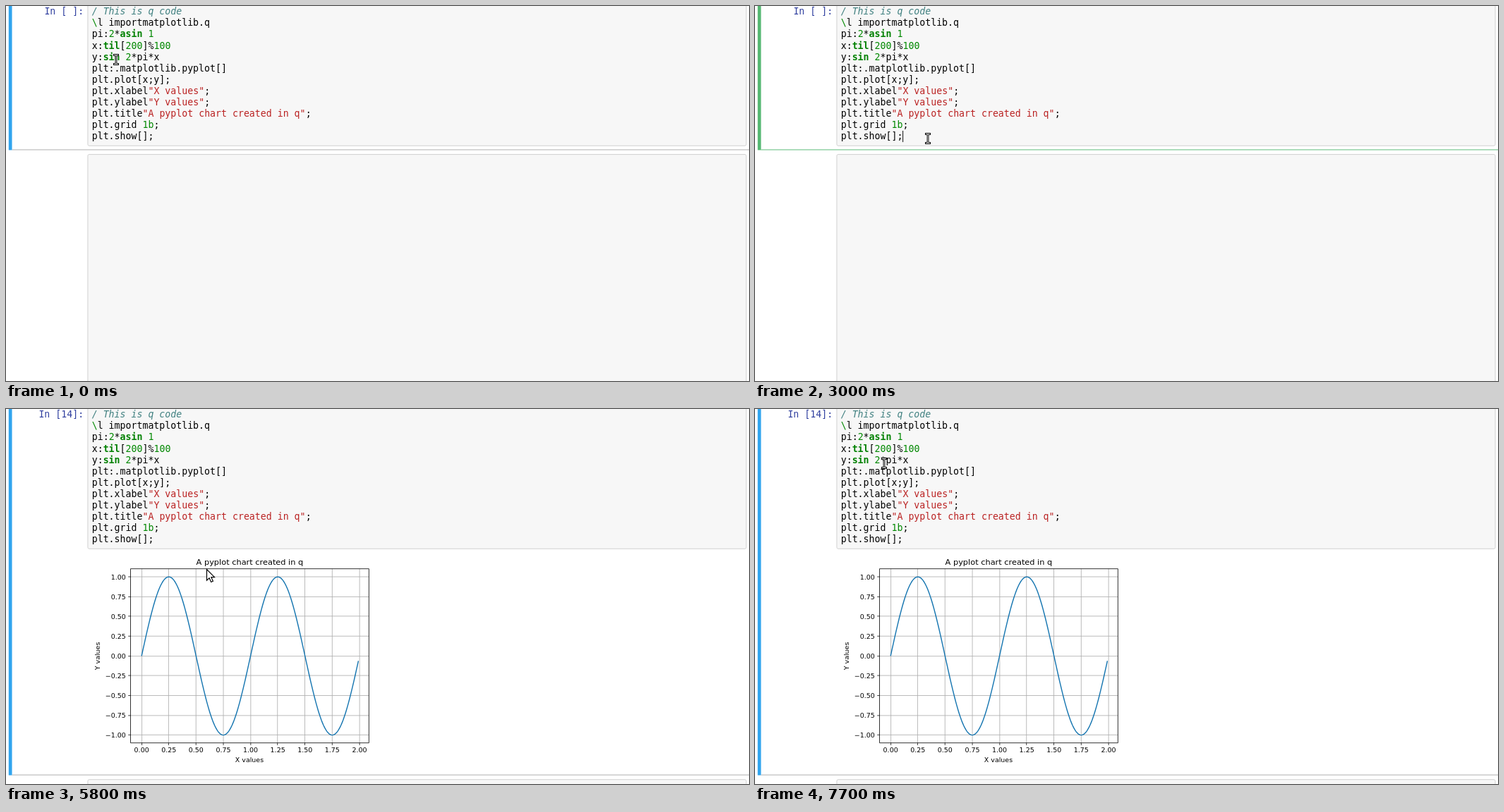
An HTML page that plays this animation: 1053x532 px, repeating every 8 s.

```html
<!DOCTYPE html>
<html lang="en">
<head>
<meta charset="utf-8">
<title>Notebook chart</title>
<style>
  html, body { margin: 0; width: 100%; height: 100%; overflow: hidden; background: #fff; }
  svg { display: block; width: 1053px; height: 532px; }
  text { white-space: pre; }
  .mono { font: 14px "DejaVu Sans Mono", monospace; }
  .plot { font: 10px "DejaVu Sans", sans-serif; }
  .title { font-size: 12px; }
  .box { fill: #f7f7f7; stroke: #cfcfcf; }
  .comment { fill: #408080; font-style: italic; }
  .string { fill: #ba2121; }
  .number { fill: #080; }
  .keyword { fill: #008000; font-weight: bold; }
</style>
</head>
<body>
<svg viewBox="0 0 1053 532" xmlns="http://www.w3.org/2000/svg">
  <rect width="1053" height="532" fill="#fff"/>
  <!-- the page is laid out in whole pixels, then zoomed to the stage -->
  <g transform="scale(.9464)">
    <rect id="bar" x="4" width="5"/>
    <rect id="rule" x="9" width="1110" height="1"/>
    <rect class="box" x="122.5" y="-20.5" width="986" height="230" rx="2"/>
    <rect class="box" id="next" x="122.5" width="986" height="400" rx="2"/>
    <text id="prompt" class="mono" x="116.4" y="13" text-anchor="end" fill="#303f9f"></text>
    <g id="code" class="mono"></g>
    <rect id="caret" x="221" y="187" width="1" height="17"/>
    <g id="chart" class="plot"></g>
  </g>
  <g id="beam" fill="none" stroke-linecap="square">
    <path d="M-2.6-6.5H2.6M-2.6 6.5H2.6M0-6.5V6.5" stroke="#000" stroke-width="2.8"/>
    <path d="M-2.6-6.5H2.6M-2.6 6.5H2.6M0-6.5V6.5" stroke="#fff" stroke-width=".9"/>
  </g>
  <path id="arrow" d="M0 0V15.6L3.6 12.3L6.2 18L8.9 16.8L6.4 11.2H11Z" fill="#fff" stroke="#000" stroke-width="1.2"/>
</svg>
<script>
const LOOP = 8000, TICK = 100;
const $ = id => document.getElementById(id);

function add(parent, tag, attrs, text) {
  const el = document.createElementNS("http://www.w3.org/2000/svg", tag);
  for (const k in attrs) el.setAttribute(k, attrs[k]);
  if (text !== undefined) el.textContent = text;
  return parent.appendChild(el);
}

function set(id, attrs) {
  for (const k in attrs) $(id).setAttribute(k, attrs[k]);
}

const show = (id, on) => set(id, { visibility: on ? "visible" : "hidden" });

// Code cell
const LINES = String.raw`/ This is q code
\l importmatplotlib.q
pi:2*asin 1
x:til[200]%100
y:sin 2*pi*x
plt:.matplotlib.pyplot[]
plt.plot[x;y];
plt.xlabel"X values";
plt.ylabel"Y values";
plt.title"A pyplot chart created in q";
plt.grid 1b;
plt.show[];`.split("\n");
const TOKEN = /(^\/.*|"[^"]*"|\b(?:asin|sin|til)\b|\d+b?|\\)/;
const ADVANCE = 8.4287, LINE = 17;

function kind(s) {
  if (s[0] === "/") return "comment";
  if (s[0] === '"') return "string";
  if (/^[\d\\]/.test(s)) return "number";
  return /^(asin|sin|til)$/.test(s) ? "keyword" : "plain";
}

LINES.forEach((line, i) => {
  let col = 0;
  for (const part of line.split(TOKEN)) {
    if (part) add($("code"), "text", {
      x: 128.6 + col * ADVANCE, y: 13 + LINE * i, class: kind(part)
    }, part);
    col += part.length;
  }
});

// Chart
const AX = { l: 186.5, r: 543.5, t: 239.5, b: 500.5 };
const px = x => 186.8 + (x + 0.0995) / 2.189 * 357.12;
const py = y => 370.2 - y * 118.6;
const snap = v => Math.floor(v) + 0.5;
const label = v => v.toFixed(2).replace("-", "\u2212");

function drawChart() {
  const g = $("chart");
  const line = (d, stroke, width) =>
    add(g, "path", { d, stroke, "stroke-width": width, fill: "none", "stroke-linejoin": "round" });
  const mid = (AX.l + AX.r) / 2;
  let grid = "", ticks = "";
  for (let i = 0; i <= 8; i++) {
    const xv = i / 4, yv = 1 - i / 4;
    const x = snap(px(xv)), y = snap(py(yv));
    grid += `M${x} ${AX.t}V${AX.b}M${AX.l} ${y}H${AX.r}`;
    ticks += `M${x} ${AX.b}v3.5M${AX.l} ${y}h-3.5`;
    add(g, "text", { x: px(xv), y: 515, "text-anchor": "middle" }, label(xv));
    add(g, "text", { x: 179.3, y: py(yv) + 3.7, "text-anchor": "end" }, label(yv));
  }
  line(grid, "#b0b0b0", 0.9);
  let curve = "";
  for (let i = 0; i < 200; i++) {
    const x = i / 100;
    curve += `${i ? "L" : "M"}${px(x).toFixed(2)} ${py(Math.sin(2 * Math.PI * x)).toFixed(2)}`;
  }
  line(curve, "#1575b0", 1.5);
  line(ticks, "#000", 0.8);
  line(`M${AX.l} ${AX.t}H${AX.r}V${AX.b}H${AX.l}Z`, "#000", 0.85);
  add(g, "text", { x: mid, y: 233, "text-anchor": "middle", class: "title" }, "A pyplot chart created in q");
  add(g, "text", { x: mid - 0.5, y: 529.2, "text-anchor": "middle" }, "X values");
  add(g, "text", { transform: "translate(140.5 370.3) rotate(-90)", "text-anchor": "middle" }, "Y values");
}
drawChart();

// Pointer path: start, end, goal, easing
const smooth = p => p * p * (3 - 2 * p);
const easeIn = p => Math.pow(p, 1.4);
const easeOut = p => 1 - Math.pow(1 - p, 1.5);
const linear = p => p;
const HOME = [156, 76];
const MOVES = [
  [600, 1300, [240, 187], smooth],
  [2400, 2500, [245, 188], linear],
  [5700, 5800, [284, 227], linear],
  [5800, 6000, [307, 288], easeOut],
  [6400, 6700, [295, 238], easeIn],
  [6700, 7300, [242.5, 70], easeOut],
  [7300, 7700, [183, 77], smooth]
];

function pointer(t) {
  let at = HOME;
  for (const [from, to, goal, ease] of MOVES) {
    if (t <= from) break;
    const p = ease(Math.min(1, (t - from) / (to - from)));
    at = at.map((v, i) => v + (goal[i] - v) * p);
  }
  return at;
}

function render(t) {
  const editing = t >= 1900 && t < 3800;
  const done = t >= 4000;
  const bottom = done ? 548 : 215;
  set("bar", { height: bottom + 1, fill: editing ? "#55b872" : "#30a4ee" });
  set("rule", { y: bottom, fill: editing ? "#55b872" : "#ababab" });
  set("next", { y: bottom + 7.5 });
  $("prompt").textContent = `In [${done ? "14" : t >= 3800 ? "*" : " "}]:`;
  show("chart", done);
  show("caret", editing && (t < 2500 || (t >= 3000 && t < 3500)));

  const [x, y] = pointer(Math.floor(t / TICK) * TICK);
  const overCode = y < 198;
  show("beam", overCode);
  show("arrow", !overCode);
  set("beam", { transform: `translate(${x} ${y})` });
  set("arrow", { transform: `translate(${x + 0.5} ${y + 0.5})` });
}

function frame() {
  render(performance.now() % LOOP);
  requestAnimationFrame(frame);
}
frame();
</script>
</body>
</html>
```
